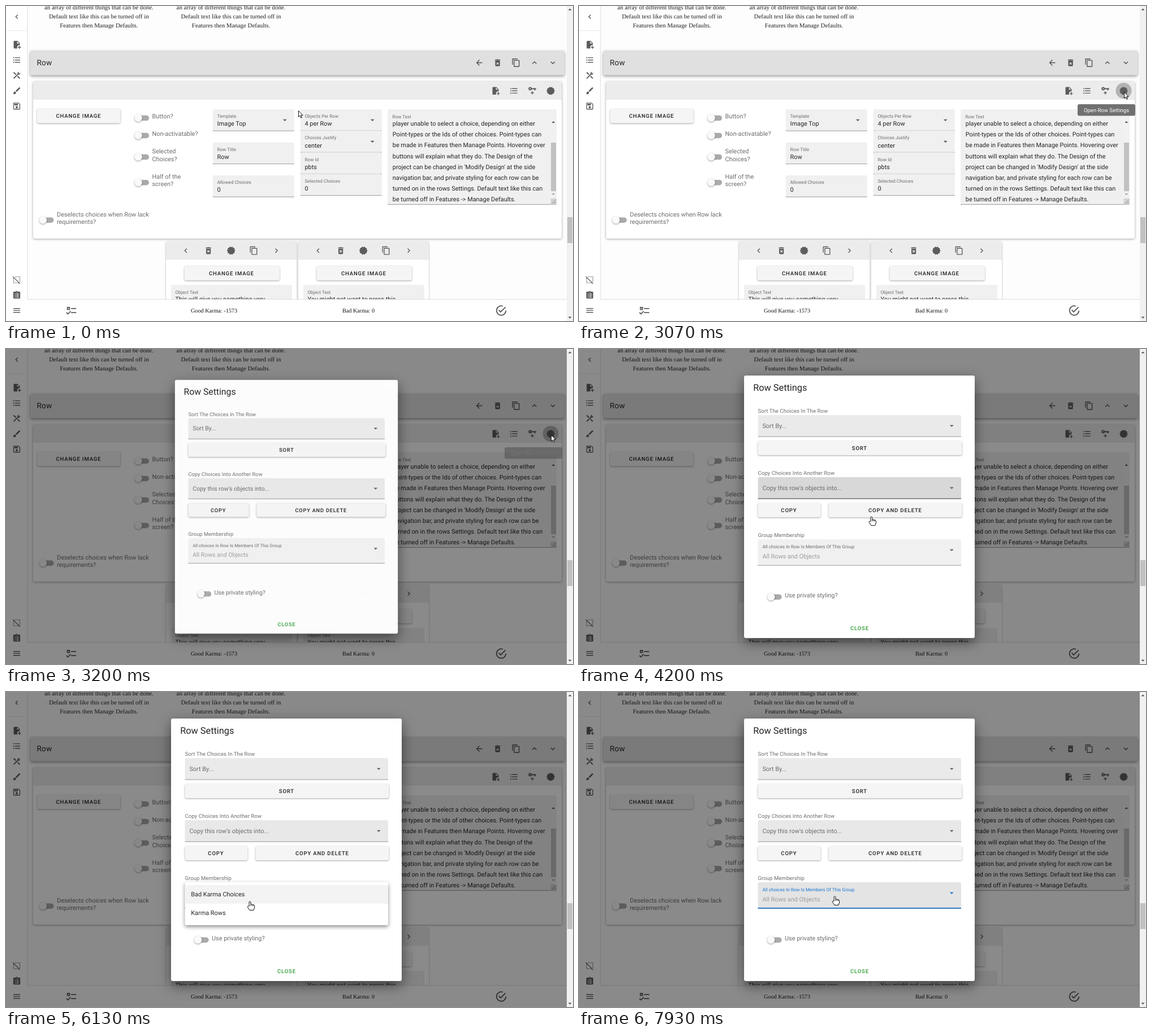
An HTML page with a canvas that plays this animation: 1003 px wide and 558 px high, repeating every 8 s.

```html
<!DOCTYPE html>
<html lang="en">
<head>
<meta charset="utf-8">
<title>Row settings</title>
<style>
html, body { margin: 0; width: 100%; height: 100%; overflow: hidden; background: #fff; }
canvas { display: block; }
</style>
</head>
<body>
<canvas id="stage" width="1003" height="558"></canvas>
<script>
const ctx = document.getElementById('stage').getContext('2d');
const LOOP = 8000;
const SANS = 'Roboto, sans-serif';
const SERIF = '"Liberation Serif", "Times New Roman", serif';
const BODY = 10.88, SMALL = 8.16, BUTTON = 9.52;
const INK = '#242424', MUTED = '#6c6c6c', ICON = '#5c5c5c', BLUE = '#1976d2';

const dot = y => `M4,${y - 1.5}a1.5,1.5 0 1,1 0,3a1.5,1.5 0 1,1 0,-3Z`;
const icons = {
  left: 'M15.41,16.58L10.83,12L15.41,7.41L14,6L8,12L14,18Z',
  right: 'M8.59,16.58L13.17,12L8.59,7.41L10,6L16,12L10,18Z',
  up: 'M7.41,15.41L12,10.83L16.59,15.41L18,14L12,8L6,14Z',
  down: 'M7.41,8.58L12,13.17L16.59,8.58L18,10L12,16L6,10Z',
  back: 'M20,11V13H8L13.5,18.5L12.08,19.92L4.16,12L12.08,4.08L13.5,5.5L8,11Z',
  caret: 'M7,10L12,15L17,10Z',
  file: 'M14,2H6C4.9,2 4,2.9 4,4V20C4,21.1 4.9,22 6,22H13.8C13.3,21.1 13,20 13,19C13,15.7 15.7,13 19,13L20,13.1V8ZM13,9V3.5L18.5,9ZM23,20H20V23H18V20H15V18H18V15H20V18H23Z',
  list: 'M7,5H21V7H7ZM7,11H21V13H7ZM7,17H21V19H7Z' + dot(6) + dot(12) + dot(18),
  tools: 'M3,5L5,3L11,9L9,11ZM13,15L15,13L21,19L19,21ZM3,19L14,8C13,5 16,2 19,3L16.5,5.5L18.5,7.5L21,5C22,8 19,11 16,10L5,21Z',
  brush: 'M20.7,4.6L19.4,3.3C19,2.9 18.4,2.9 18,3.3L9,12.3L11.8,15L20.7,6C21.1,5.7 21.1,5 20.7,4.6ZM7,14A3,3 0 0,0 4,17C4,18.3 2.8,19 2,19C2.9,20.2 4.5,21 6,21A4,4 0 0,0 10,17A3,3 0 0,0 7,14Z',
  save: 'M17,3H5C3.9,3 3,3.9 3,5V19C3,20.1 3.9,21 5,21H19C20.1,21 21,20.1 21,19V7ZM19,19H5V5H16.2L19,7.8ZM12,12a3,3 0 1,0 0,6a3,3 0 1,0 0,-6ZM6,6H15V10H6Z',
  deselect: 'M1,4L2.3,2.7L21.3,21.7L20,23ZM7,3H9V5H7ZM11,3H13V5H11ZM15,3H17V5H15ZM19,3H21V5H19ZM19,7H21V9H19ZM19,11H21V13H19ZM19,15H21V17H19ZM3,7H5V9H3ZM3,11H5V13H3ZM3,15H5V17H3ZM3,19H5V21H3ZM7,19H9V21H7ZM11,19H13V21H11ZM15,19H17V21H15Z',
  clipboard: 'M19,3H14.8C14.4,1.8 13.3,1 12,1C10.7,1 9.6,1.8 9.2,3H5A2,2 0 0,0 3,5V19A2,2 0 0,0 5,21H19A2,2 0 0,0 21,19V5A2,2 0 0,0 19,3ZM12,3a1,1 0 1,1 0,2a1,1 0 1,1 0,-2ZM7,8H9V10H7ZM11,8H17V10H11ZM7,12H9V14H7ZM11,12H17V14H11ZM7,16H9V18H7ZM11,16H17V18H11Z',
  menu: 'M3,6H21V8H3ZM3,11H21V13H3ZM3,16H21V18H3Z',
  trash: 'M6,19A2,2 0 0,0 8,21H16A2,2 0 0,0 18,19V7H6ZM8.5,11.9L9.9,10.5L12,12.6L14.1,10.5L15.5,11.9L13.4,14L15.5,16.1L14.1,17.5L12,15.4L9.9,17.5L8.5,16.1L10.6,14ZM15.5,4L14.5,3H9.5L8.5,4H5V6H19V4Z',
  copy: 'M19,21H8V7H19ZM19,5H8A2,2 0 0,0 6,7V21A2,2 0 0,0 8,23H19A2,2 0 0,0 21,21V7A2,2 0 0,0 19,5ZM16,1H4A2,2 0 0,0 2,3V17H4V3H16Z',
  key: 'M6.5,2C8.5,2 10.1,3.2 10.7,5H22V8H20V11H17V8H10.7C10.1,9.8 8.5,11 6.5,11A4.5,4.5 0 0,1 6.5,2ZM6.5,5a1.5,1.5 0 1,0 0,3a1.5,1.5 0 1,0 0,-3ZM11,13H13V16H16V18H13V21H11V18H8V16H11Z',
  seal: 'M23,12L20.6,9.2L20.9,5.5L17.3,4.7L15.4,1.5L12,3L8.6,1.5L6.7,4.7L3.1,5.5L3.4,9.2L1,12L3.4,14.8L3.1,18.5L6.7,19.3L8.6,22.5L12,21L15.4,22.5L17.3,19.3L20.9,18.5L20.6,14.8Z',
  checks: 'M3,5H9V11H3ZM5,7V9H7V7ZM11,7H21V9H11ZM11,15H21V17H11ZM5,20L1.5,16.5L2.9,15.1L5,17.2L9.6,12.6L11,14Z',
  done: 'M20,12A8,8 0 1,1 14.2,4.3L15.8,2.7A10,10 0 1,0 22,12ZM7.9,10.1L6.5,11.5L11,16L21,6L19.6,4.6L11,13.2Z'
};
for (const name in icons) icons[name] = new Path2D(icons[name]);
const arrowShape = new Path2D('M0 0V11L2.5 8.7 4.3 12.7 6 12 4.3 8.1H7.6Z');
const handShape = new Path2D('M-1.4 9V1.2Q0-.8 1.4 1.2V5.6Q2.8 4.6 3.8 6.1Q5.2 5.2 6 6.6Q8 6.3 8 8V11.5L6.6 16H-.6L-4 10.6Q-4.8 8.8-3 8.6Z');

const clamp = v => Math.max(0, Math.min(1, v));
const ramp = (t, a, b) => clamp((t - a) / (b - a));
const pulse = (t, on, off, fade = 130) => ramp(t, on, on + fade) * (1 - ramp(t, off, off + fade));
const grey = v => `rgb(${v},${v},${v})`;

// Each stop is [time, x, y].
const path = [
  [730, 517, 185], [1000, 655, 197], [1330, 889, 178], [1530, 953, 158], [1800, 964, 152],
  [3440, 964, 152], [3700, 850, 189], [4200, 517, 296], [4600, 431, 370],
  [6130, 431, 370], [6500, 434, 371], [6930, 437, 373], [7400, 432, 366],
  [7800, 435, 361], [7870, 442, 361], [7930, 452, 361]
];

function pointerAt(t) {
  const next = path.findIndex(p => p[0] > t);
  if (next === 0) return path[0].slice(1);
  if (next < 0) return path[path.length - 1].slice(1);
  const [a, b] = [path[next - 1], path[next]];
  const u = ramp(t, a[0], b[0]);
  return [a[1] + (b[1] - a[1]) * u, a[2] + (b[2] - a[2]) * u];
}

function rect(x, y, w, h, fill) {
  ctx.fillStyle = fill;
  ctx.fillRect(x, y, w, h);
}

function panel(x, y, w, h, fill, blur = 3, drop = 1, shade = 0.35, radius = 3) {
  ctx.save();
  ctx.shadowColor = `rgba(0,0,0,${shade})`;
  ctx.shadowBlur = blur;
  ctx.shadowOffsetY = drop;
  ctx.fillStyle = fill;
  ctx.beginPath();
  ctx.roundRect(x, y, w, h, radius);
  ctx.fill();
  ctx.restore();
}

function text(str, x, y, { size = BODY, color = INK, weight = 400, align = 'left', family = SANS, spacing = 0 } = {}) {
  ctx.font = `${weight} ${size}px ${family}`;
  ctx.letterSpacing = spacing + 'px';
  ctx.textAlign = align;
  ctx.fillStyle = color;
  ctx.fillText(str, x, y);
}

function icon(name, x, y, color = ICON, scale = 0.68) {
  ctx.save();
  ctx.translate(x, y);
  ctx.scale(scale, scale);
  ctx.translate(-12, -12);
  ctx.fillStyle = color;
  ctx.fill(icons[name], 'evenodd');
  ctx.restore();
}

function button(label, x, y, w, h = 25, center = x + w / 2) {
  panel(x, y, w, h, '#f5f5f5');
  text(label, center + 0.4, y + h / 2 + 3.5, { size: BUTTON, weight: 500, align: 'center', spacing: 0.85, color: '#1f1f1f' });
}

function toggle(x, y, lines, labelX, labelY) {
  ctx.fillStyle = '#aaa';
  ctx.beginPath();
  ctx.roundRect(x - 5, y - 4.5, 24, 9.5, 4.75);
  ctx.fill();
  panel(x - 6.7, y - 6.7, 13.4, 13.4, '#fafafa', 3, 1, 0.4, 6.7);
  lines.forEach((line, i) => text(line, labelX, labelY + i * 13.4, { color: MUTED }));
}

function fieldBox(x, y, w, h, hover, base = 240) {
  ctx.fillStyle = grey(base - 16 * hover);
  ctx.beginPath();
  ctx.roundRect(x, y, w, h, [3, 3, 0, 0]);
  ctx.fill();
  rect(x, y + h - 0.8, w, 0.9, grey(145 - 100 * hover));
}

function field(label, value, x, y, isSelect = false, hover = 0) {
  fieldBox(x, y, 144, 38.5, hover);
  text(label, x + 7.8, y + 15.3, { size: SMALL, color: MUTED });
  text(value, x + 7.8, y + 29.4);
  if (isSelect) icon('caret', x + 127.5, y + 19);
}

function triangle(x, y, dir, color = '#505050') {
  ctx.fillStyle = color;
  ctx.beginPath();
  ctx.moveTo(x - 3, y + 1.5 * dir);
  ctx.lineTo(x + 3, y + 1.5 * dir);
  ctx.lineTo(x, y - 1.5 * dir);
  ctx.fill();
}

const intro = ['an array of different things that can be done.',
  'Default text like this can be turned off in', 'Features then Manage Defaults.'];
const rowText = [
  'player unable to select a choice, depending on either',
  'Point-types or the Ids of other choices. Point-types can',
  'be made in Features then Manage Points. Hovering over',
  'buttons will explain what they do. The Design of the',
  "project can be changed in 'Modify Design' at the side",
  'navigation bar, and private styling for each row can be',
  'turned on in the rows Settings. Default text like this can',
  'be turned off in Features -> Manage Defaults.'];

function drawTextArea(hover) {
  fieldBox(675, 183, 299, 169, hover);
  text('Row Text', 683.5, 198.6, { size: SMALL, color: MUTED });
  rowText.forEach((line, i) => text(line, 683.8, 212.4 + i * 19.04));
  rect(963.5, 201, 10, 140, grey(241 - 12 * hover));
  rect(964, 242, 9, 86, '#c1c1c1');
  triangle(968.3, 205.5, 1);
  triangle(968.3, 333.5, -1, '#a3a3a3');
  rect(963.5, 341, 10.5, 10.5, '#d4d4d4');
  ctx.strokeStyle = '#777';
  ctx.lineWidth = 0.8;
  ctx.beginPath();
  ctx.moveTo(965.5, 350); ctx.lineTo(972.5, 343);
  ctx.moveTo(969.5, 350); ctx.lineTo(972.5, 347);
  ctx.stroke();
}

function drawObject(x, firstWords) {
  panel(x, 417, 231, 140, '#fff');
  rect(x, 417, 231, 32.5, '#ececec');
  ['left', 'trash', 'seal', 'copy', 'right'].forEach((name, i) => icon(name, x + 35 + i * 40.1, 433.3));
  button('CHANGE IMAGE', x + 32.5, 460.5, 168.5, 25.5, x + 115.5);
  fieldBox(x + 9, 494, 214, 80, 0);
  text('Object Text', x + 16.5, 510.3, { size: SMALL, color: MUTED });
  text(firstWords, x + 16.5, 523.4);
}

function drawPage(t) {
  rect(0, 0, 1003, 558, '#fdfdfd');
  for (const x of [164.3, 398])
    intro.forEach((line, i) => text(line, x, 5.8 + i * 16.3, { family: SERIF, align: 'center', color: '#222' }));

  panel(43, 79, 945, 43.5, '#e0e0e0', 5, 2, 0.4);
  text('Row', 54.5, 105.4, { size: 13.6, spacing: 0.17 });
  ['back', 'trash', 'copy', 'up', 'down'].forEach((name, i) => icon(name, 837 + i * 32.6, 100.5, '#505050'));

  panel(48, 134, 935, 278, '#fff', 4, 1);
  rect(48, 134, 935, 32, '#ececec');
  const ring = pulse(t, 2600, 3420, 200);
  if (ring) {
    ctx.fillStyle = `rgba(0,0,0,${ring * (0.14 + 0.1 * ramp(t, 2900, 3060))})`;
    ctx.beginPath();
    ctx.arc(963.5, 150, 14, 0, 7);
    ctx.fill();
  }
  ['file', 'list', 'key', 'seal'].forEach((name, i) => icon(name, 866 + i * 32.5, 150.3));

  button('CHANGE IMAGE', 55, 182, 147.5, 25.5, 128);
  toggle(234, 198.3, ['Button?'], 258.5, 199);
  toggle(234, 229.2, ['Non-activatable?'], 258.5, 230);
  toggle(234, 267.3, ['Selected', 'Choices?'], 258.5, 261.4);
  toggle(234, 312.5, ['Half of the', 'screen?'], 258.5, 305.8);
  toggle(65.5, 379, ['Deselects choices when Row lack', 'requirements?'], 90, 373);

  field('Template', 'Image Top', 365.7, 183, true);
  field('Row Title', 'Row', 365.7, 241.6);
  field('Allowed Choices', '0', 365.7, 300);
  field('Objects Per Row', '4 per Row', 520.7, 183, true, pulse(t, 740, 1000));
  field('Choices Justify', 'center', 520.7, 221.1, true);
  field('Row Id', 'pbts', 520.7, 259.2);
  field('Selected Choices', '0', 520.7, 297.3);
  drawTextArea(pulse(t, 1030, 1340));

  drawObject(283, 'This will give you something very');
  drawObject(517, 'You might not want to press this,');

  const tip = pulse(t, 2640, 3120, 140);
  if (tip) {
    ctx.globalAlpha = tip;
    panel(882, 174, 102, 20.5, '#707070', 0, 0, 0);
    text('Open Row Settings', 933, 187.8, { size: BUTTON, color: '#fff', align: 'center' });
    ctx.globalAlpha = 1;
  }

  rect(0, 0, 38, 558, '#fff');
  rect(37.5, 0, 1, 520, '#dedede');
  rect(0, 43, 38, 0.8, '#e4e4e4');
  rect(0, 520, 992, 38, '#fff');
  rect(38, 519.3, 954, 1, '#dcdcdc');
  icon('left', 19, 19);
  ['file', 'list', 'tools', 'brush', 'save'].forEach((name, i) => icon(name, 19, 68.5 + i * 27.2));
  ['deselect', 'clipboard', 'menu'].forEach((name, i) => icon(name, 19, 485 + i * 27.2));
  icon('checks', 116, 539.5, ICON, 0.92);
  icon('done', 876, 539.5, ICON, 0.92);
  const karma = { family: SERIF, size: 10.2, align: 'center', color: '#111' };
  text('Good Karma: -1573', 368, 543, karma);
  text('Bad Karma: 0', 623.5, 543, karma);

  const dim = ramp(t, 3090, 3190);
  if (dim) rect(0, 0, 992, 558, `rgba(0,0,0,${0.46 * dim})`);
  rect(992, 0, 11, 558, '#f1f1f1');
  rect(993, 374, 9, 46, '#c1c1c1');
  triangle(997.5, 6, 1);
  triangle(997.5, 552, -1);
}

function drawMenu(t) {
  const open = ramp(t, 5200, 5400) * (1 - ramp(t, 6500, 6750));
  if (!open) return;
  ctx.save();
  ctx.globalAlpha *= open;
  panel(316.5, 336.5, 359.5, 76.5, '#fff', 7, 3, 0.45);
  rect(316.5, 342, 359.5, 33, grey(255 - 12 * ramp(t, 5300, 5460)));
  text('Bad Karma Choices', 327.3, 362.2);
  text('Karma Rows', 327.3, 395);
  ctx.restore();
}

function drawDialog(t) {
  const u = ramp(t, 3100, 3270);
  if (!u) return;
  const scale = 1 - 0.5 * (1 - u) ** 3;
  ctx.save();
  ctx.globalAlpha = clamp(u * 1.66);
  ctx.translate(496, 279.5);
  ctx.scale(scale, scale);
  ctx.translate(-496, -279.5);
  panel(292, 47, 408, 465, '#fff', 22, 8, 0.5);
  text('Row Settings', 308.2, 74, { size: 16.32 });

  const caption = { size: BUTTON, color: MUTED, spacing: 0.09 };
  text('Sort The Choices In The Row', 316.4, 113.2, caption);
  fieldBox(316.5, 117, 359.5, 38.5, 0, 234);
  text('Sort By...', 324.4, 139.8, { color: MUTED });
  icon('caret', 659.3, 136);
  button('SORT', 316.5, 163, 361, 25, 496);

  text('Copy Choices Into Another Row', 316.4, 223, caption);
  fieldBox(316.5, 227, 359.5, 38.5, pulse(t, 3980, 4220), 232);
  text("Copy this row's objects into...", 324.4, 249.7, { color: MUTED });
  icon('caret', 659.3, 246);
  button('COPY', 316.5, 273, 111, 25, 371);
  button('COPY AND DELETE', 441.5, 273, 236, 25, 559);

  text('Group Membership', 316.4, 333, caption);
  const focused = t >= 5200;
  fieldBox(316.5, 337, 359.5, 46.5, focused ? 0.75 : ramp(t, 4440, 4580) * 0.75);
  if (focused) rect(316.5, 382, 359.5, 1.6, BLUE);
  text('All choices In Row Is Members Of This Group', 324.4, 353.2, { size: SMALL, color: focused ? BLUE : MUTED });
  text('All Rows and Objects', 324.4, 370.6, { color: '#9c9c9c' });
  icon('caret', 659.3, 356, focused ? BLUE : ICON);

  toggle(339.7, 439, ['Use private styling?'], 364, 440);
  text('CLOSE', 496.4, 498.3, { size: BUTTON, weight: 500, align: 'center', spacing: 0.85, color: '#2f9e35' });
  drawMenu(t);
  ctx.restore();
}

function drawPointer(t) {
  const [x, y] = pointerAt(t);
  const shape = t > 3440 && x < 677 ? handShape : arrowShape;
  ctx.save();
  ctx.translate(x + 0.5, y + 0.5);
  ctx.fillStyle = '#fff';
  ctx.strokeStyle = '#111';
  ctx.lineWidth = 1;
  ctx.lineJoin = 'round';
  ctx.fill(shape);
  ctx.stroke(shape);
  if (shape === handShape) {
    ctx.beginPath();
    for (const fx of [1.4, 3.8, 6]) {
      ctx.moveTo(fx, 6);
      ctx.lineTo(fx, 8.5);
    }
    ctx.stroke();
  }
  ctx.restore();
}

function frame(now) {
  const t = now % LOOP;
  ctx.textRendering = 'geometricPrecision';
  drawPage(t);
  drawDialog(t);
  drawPointer(t);
  requestAnimationFrame(frame);
}
requestAnimationFrame(frame);
</script>
</body>
</html>
```
